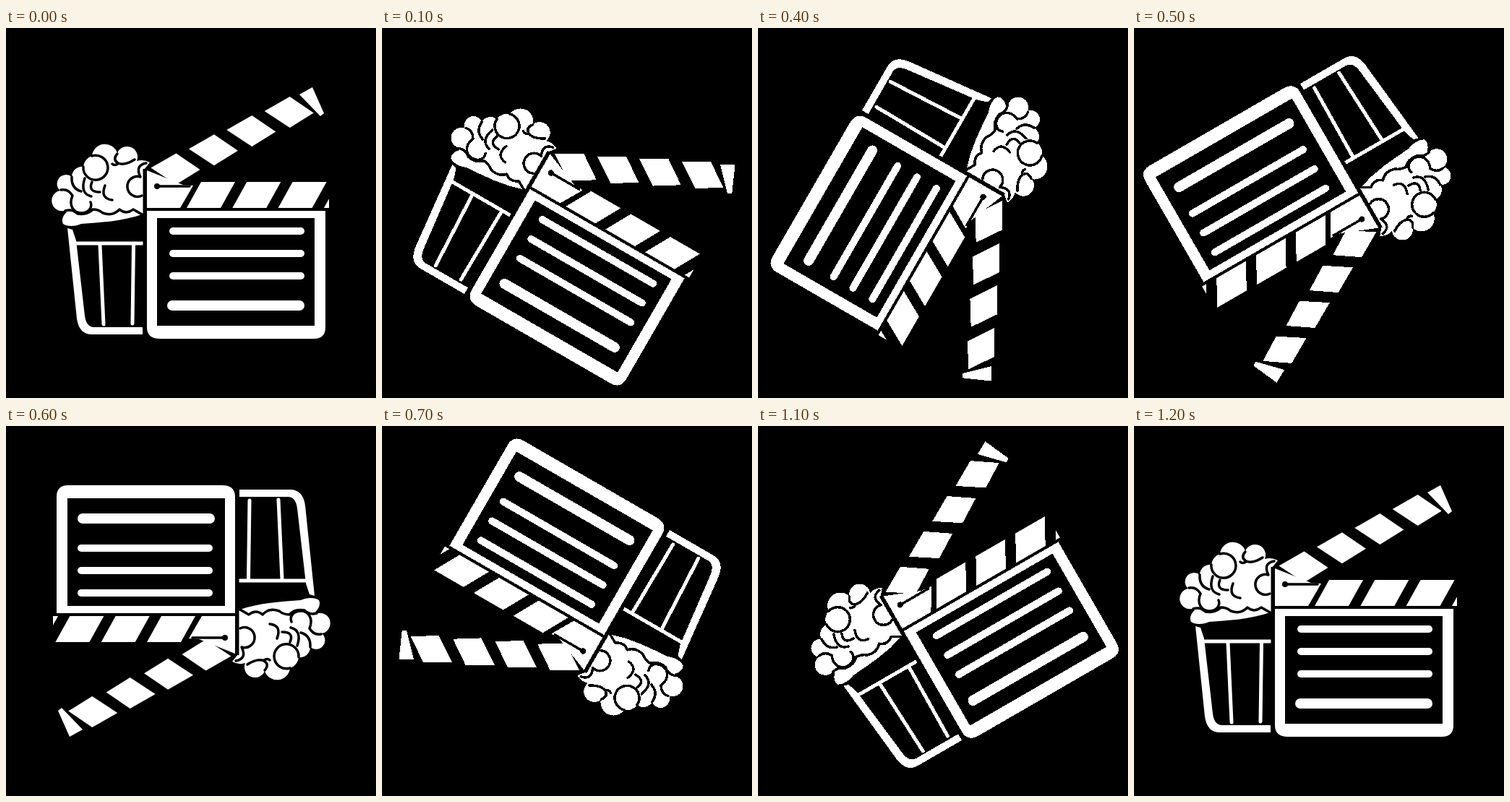
Write an HTML page that moves like this. It is 512 px wide and 512 px high and loops after 1.3 s.

```html
<!DOCTYPE html>
<html lang="en">
<head>
<meta charset="utf-8">
<title>Clapperboard and popcorn</title>
<style>
  html, body { margin: 0; width: 100%; height: 100%; overflow: hidden; background: #000; }
  svg { display: block; width: 100%; height: 100%; }
  .ink { fill: none; stroke: #000; stroke-width: 3.5; stroke-linecap: round; stroke-linejoin: round; }
  .line { fill: none; stroke: #fff; stroke-linecap: round; }
</style>
</head>
<body>
<svg viewBox="0 0 512 512">
  <clipPath id="board"><path d="M195 213H447V249H195Z"/></clipPath>
  <g id="art" fill="#fff">
    <g id="popcorn">
      <path d="M80 253A14 14 0 0 1 75 225 11 11 0 0 1 91 206 14 14 0 0 1 107 192 17 17 0 0 1 119 177 18 18 0 0 1 154 173 14 14 0 0 1 181 184Q190 181 199 186L191 196V257C160 268 130 269 104 271 96 275 84 275 79 271 76 265 80 258 84 255Z"/>
      <g class="ink">
        <path d="M107 192A17 17 0 1 0 119 177"/>
        <path d="M154 174Q147 182 155 187 164 191 178 182M155 188Q150 191 147 188"/>
        <path d="M194 187Q178 190 186 206A14 14 0 1 0 188 232"/>
        <path d="M119 213Q113 227 130 227M109 208Q102 229 118 233M91 206Q90 222 104 226"/>
        <path d="M76 224Q86 222 92 232C86 246 94 256 104 256 114 256 120 249 117 241"/>
        <path d="M137 218Q130 236 147 238"/>
        <path d="M82 253Q92 250 99 257 113 259 120 251 128 251 134 256 148 261 157 251 166 259 176 251L190 259"/>
      </g>
    </g>

    <g id="cup">
      <path d="M85 277L92 279 97 294 109 398Q111 414 122 414H189V424H119Q101 424 98 402Z"/>
      <path class="line" stroke-width="5" stroke-linecap="butt" d="M96 298H189M130 300L135 410M176.500 300L175 409"/>
    </g>

    <path d="M192 195V430" stroke="#000" stroke-width="5"/>
    <path fill-rule="evenodd" d="M195 253H442V414Q442 430 426 430H213Q195 430 195 414ZM209 263V412H427V263Z"/>
    <g id="rows" class="line"></g>

    <g id="hinge">
      <path d="M195 197L245 217 259 218 241 249H195Z"/>
      <path class="ink" d="M209 219L254 219"/>
      <circle cx="209" cy="219" r="4"  fill="#000"/>
    </g>
    <g id="base" clip-path="url(#board)"></g>
    <g id="arm"><path d="M406 92L424 82 440 118 435 122Z"/></g>
  </g>
</svg>
<script>
const byId = id => document.getElementById(id);
const art = byId("art");

function addPath(parent, d, width = 0) {
  const path = document.createElementNS("http://www.w3.org/2000/svg", "path");
  path.setAttribute("d", d);
  if (width) path.setAttribute("stroke-width", width);
  byId(parent).append(path);
}

for (let i = 0; i < 3; i++) addPath("rows", `M231 ${281 + 31 * i}H408`, 10);
addPath("rows", "M230 384H406", 14);

for (let i = 0; i < 4; i++) {
  addPath("base", `M${270 + 63.3 * i} 213h47l-20 36h-47z`);
  addPath("arm", `M${200.5 + 52.4 * i} ${193.5 - 26.2 * i}l35 -20 33 22.500 -33 20.500z`);
}

const STEP = 100, LOOP = 1300, TURN = 30;

function draw(time) {
  const angle = Math.floor((time % LOOP) / STEP) * TURN % 360;
  art.setAttribute("transform", `rotate(${angle} 256 256)`);
  art.setAttribute("shape-rendering", angle % 90 ? "crispEdges" : "auto");
}

const start = performance.now();
function tick(now) {
  draw(Math.max(0, now - start));
  requestAnimationFrame(tick);
}
draw(0);
requestAnimationFrame(tick);
</script>
</body>
</html>
```
